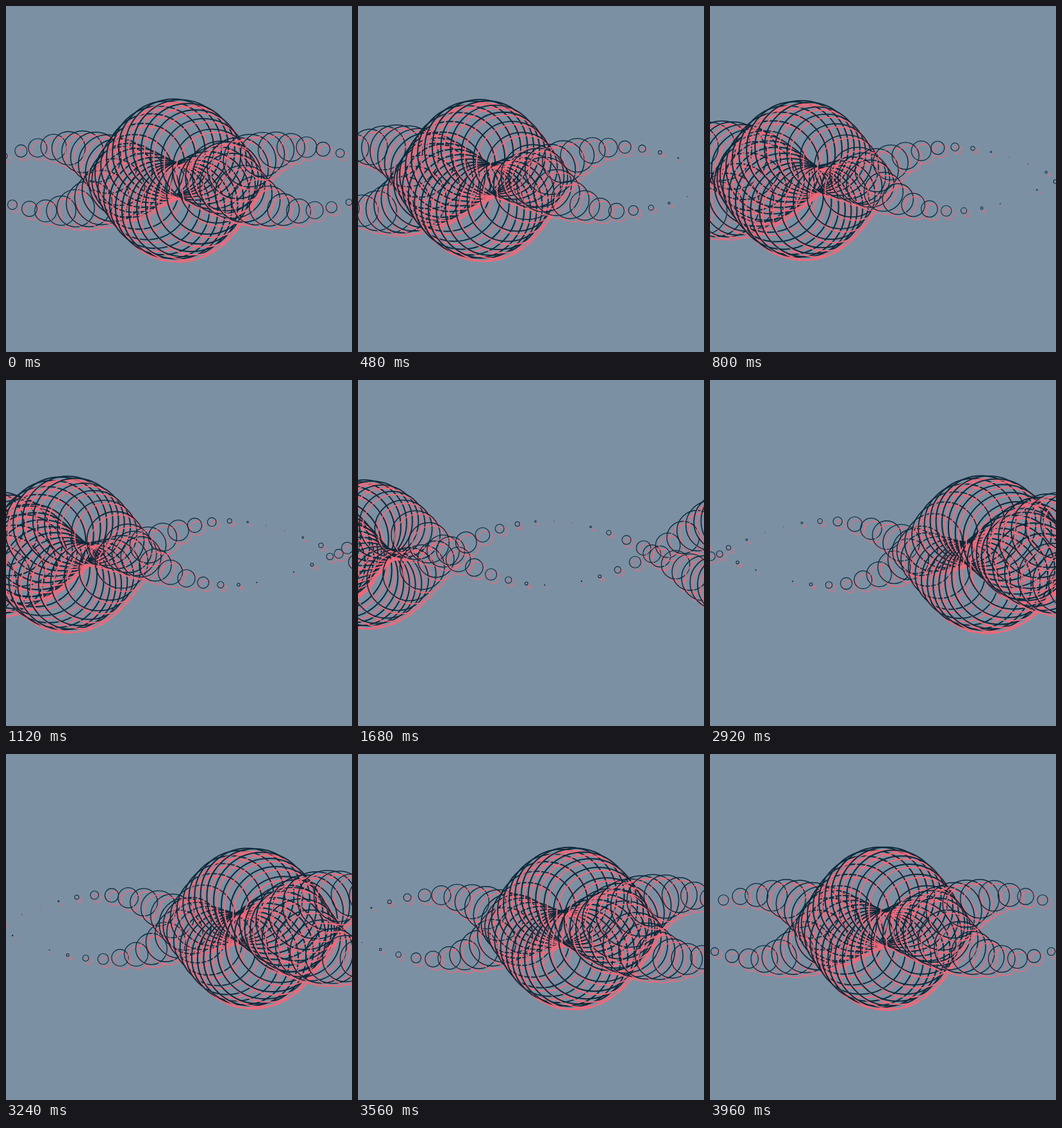
Animation, 540 px wide and 540 px high, one loop 4000 ms. Source, as an HTML page with a canvas:

```html
<!DOCTYPE html>
<html lang="en">
<head>
<meta charset="utf-8">
<title>Circle waves</title>
<style>
  html, body { margin: 0; width: 100%; height: 100%; overflow: hidden; background: #7c90a3; }
  canvas { display: block; }
</style>
</head>
<body>
<canvas width="540" height="540"></canvas>
<script>
const ctx = document.querySelector('canvas').getContext('2d');
const TAU = Math.PI * 2;
const LOOP = 4000, STEP = 40;
const SPACING = 10, MID = 270, SWAY = 50, MAX_RADIUS = 75, SHADOW = 5;
// Wavelengths and starting crests of the two waves, in pixels.
const SWELL = { length: 711.5, start: 618.7 };
const WEAVE = { length: 474.3, start: 502.4 };

const phase = (wave, x, t) => TAU * ((x - wave.start) / wave.length + t);

function ring(x, y, radius, color) {
  ctx.beginPath();
  ctx.arc(x, y, radius, 0, TAU);
  ctx.strokeStyle = color;
  ctx.lineWidth = 1 + radius / MAX_RADIUS;
  ctx.stroke();
}

function draw(t) {
  ctx.fillStyle = '#7c90a3';
  ctx.fillRect(0, 0, 540, 540);
  for (let i = -22; i <= 76; i++) {
    const home = i * SPACING;
    const swell = phase(SWELL, home, t);
    const strand = i % 2 ? -1 : 1;
    const x = home + SWAY * Math.sin(swell);
    const y = MID + strand * SWAY * Math.cos(phase(WEAVE, home, t));
    const radius = MAX_RADIUS * (1 - Math.cos(swell)) / 2;
    ring(x + SHADOW, y + SHADOW, radius, '#f26878');
    ring(x, y, radius, '#0c2939');
  }
}

function frame() {
  const time = performance.now() % LOOP;
  draw(Math.floor(time / STEP) * STEP / LOOP);
  requestAnimationFrame(frame);
}
frame();
</script>
</body>
</html>
```
